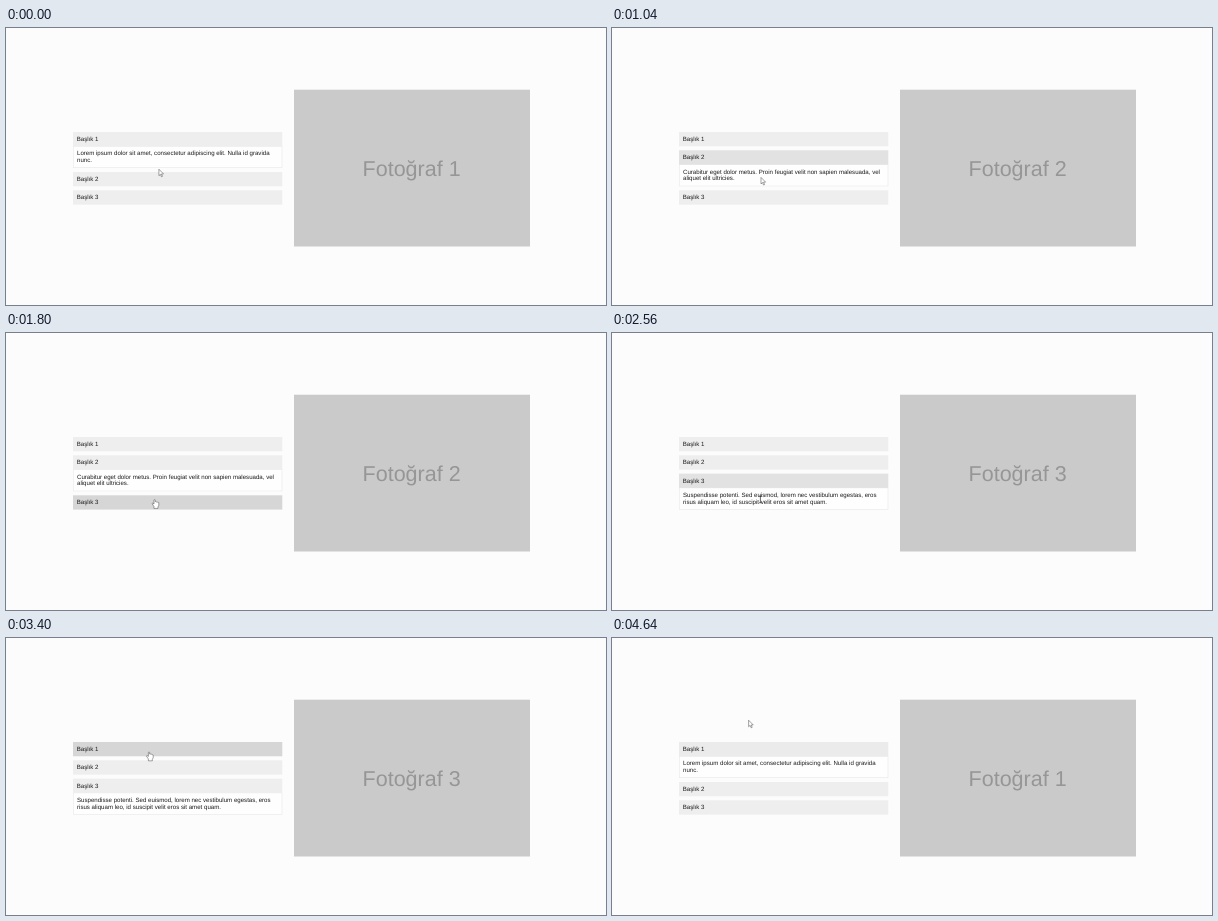
An HTML page for the animation above (8 s loop, 600 by 277 pixels).

```html
<!DOCTYPE html>
<html lang="tr">
<head>
<meta charset="utf-8">
<title>Akordeon</title>
<style>
  html, body { margin: 0; width: 100%; height: 100%; overflow: hidden; background: #fdfcfd; }
  svg { display: block; width: 100%; height: 100%; }
  text { font-family: "Liberation Sans", Arial, sans-serif; font-size: 6.11px; fill: #1c1b1c; text-rendering: geometricPrecision; }
  #photo text { font-size: 21.5px; fill: #979697; text-anchor: middle; }
  .panel { fill: #fefefe; stroke: #e9e8e9; stroke-width: .6; }
  #cursor path { fill: #fff; stroke: #3a3a3a; stroke-width: 1.1; stroke-linejoin: round; }
  #cursor #ibeam { fill: none; stroke: #222; stroke-width: 1.6; }
</style>
</head>
<body>
<svg viewBox="0 0 600 277">
  <g id="photo">
    <rect x="288" y="61.7" width="236" height="156.8" fill="#cbcacb"/>
    <text x="405.6" y="147.6"></text>
  </g>
  <g id="accordion"></g>
  <g id="cursor">
    <path id="arrow" d="M.5 .5V16L4 12.7L6.5 18.5L9 17.5L6.5 11.8H11.5Z"/>
    <path id="hand" transform="translate(-6 0)" d="M6.5 .5C5.5 .5 5 1 5 2V11L3 9.5C2 8.5 .5 9 .5 10.5L5 17V21.5H14.5V18L16.5 14V8C16.5 6.8 15 6.3 14 7C13.5 5.6 12 5.6 11 6.2C10.5 5 9 4.8 8 5.4V2C8 1 7.5 .5 6.5 .5Z"/>
    <path id="ibeam" d="M-3 -8H3M0 -8V8M-3 8H3"/>
  </g>
</svg>
<script>
const LOOP = 8000, STEP = 40, FADE = .5;
const LEFT = 67, TOP = 104, WIDTH = 209.3, HEAD = 14.3, PITCH = 18.3, PANEL = 21.7;
const BASE = 239, HOVER = 215;

const sections = [
  ["Lorem ipsum dolor sit amet, consectetur adipiscing elit. Nulla id gravida", "nunc."],
  ["Curabitur eget dolor metus. Proin feugiat velit non sapien malesuada, vel", "aliquet elit ultricies."],
  ["Suspendisse potenti. Sed euismod, lorem nec vestibulum egestas, eros", "risus aliquam leo, id suscipit velit eros sit amet quam."]
];

const origin = { x: 152.7, y: 141 };
const moves = [
  { from: 120, to: 360, x: 148.8, y: 149.2 },
  { from: 1160, to: 1640, x: 148.4, y: 166.4 },
  { from: 2560, to: 3320, x: 142.8, y: 113.8, overshoot: 1.7 },
  { from: 4520, to: 4640, x: 136.4, y: 82 }
];
const clicks = [1040, 2560, 4080];

const $ = id => document.getElementById(id);
const photoText = document.querySelector("#photo text");

function add(parent, tag, attrs, content = "") {
  const node = document.createElementNS("http://www.w3.org/2000/svg", tag);
  for (const key in attrs) node.setAttribute(key, attrs[key]);
  node.textContent = content;
  return parent.appendChild(node);
}

const parts = sections.map((lines, i) => {
  const group = add($("accordion"), "g", {});
  const panel = add(group, "g", {});
  add(panel, "rect", { class: "panel", x: LEFT + .3, y: HEAD, width: WIDTH - .6, height: PANEL - .3 });
  const boxes = lines.map((line, n) => add(panel, "text", { x: 71, y: 23.3 + n * 6.8 }, line).getBBox());
  const head = add(group, "rect", { x: LEFT, y: 0, width: WIDTH, height: HEAD });
  add(group, "text", { x: 70.7, y: 9.1 }, `Başlık ${i + 1}`);
  return { group, panel, head, boxes };
});

const easeOut = (p, back = 0) => 1 + (back + 1) * (p - 1) ** 3 + back * (p - 1) ** 2;

function pointerAt(t) {
  return moves.reduce((pos, m) => {
    const p = Math.min(1, Math.max(0, (t - m.from) / (m.to - m.from)));
    const e = easeOut(p, m.overshoot);
    return { x: pos.x + (m.x - pos.x) * e, y: pos.y + (m.y - pos.y) * e };
  }, origin);
}

const headY = (i, open) => TOP + i * PITCH + (i > open ? PANEL : 0);

const headUnder = (y, open) =>
  sections.findIndex((_, i) => y >= headY(i, open) && y < headY(i, open) + HEAD);

const overText = ({ x, y }, open) => parts[open].boxes.some(b => {
  const localY = y - headY(open, open);
  return x >= b.x && x <= b.x + b.width && localY >= b.y && localY <= b.y + b.height;
});

// Replays pointer, clicks and hover fades once, so each moment has a fixed state.
function simulate() {
  const states = [];
  let open = 0, glow = sections.map(() => 0);
  for (let t = 0; t < LOOP; t += STEP) {
    const pointer = pointerAt(t);
    if (clicks.includes(t)) open = headUnder(pointer.y, open);
    const hovered = headUnder(pointer.y, open);
    glow = glow.map((g, i) => g + ((i === hovered) - g) * FADE);
    const shape = hovered >= 0 ? "hand" : overText(pointer, open) ? "ibeam" : "arrow";
    states.push({ pointer, open, glow, shape });
  }
  return states;
}

function draw({ pointer, open, glow, shape }) {
  photoText.textContent = `Fotoğraf ${open + 1}`;
  parts.forEach(({ group, panel, head }, i) => {
    const level = Math.round(BASE + (HOVER - BASE) * glow[i]);
    group.setAttribute("transform", `translate(0 ${headY(i, open)})`);
    panel.style.display = i === open ? "" : "none";
    head.style.fill = `rgb(${level}, ${level - 1}, ${level})`;
  });
  $("cursor").setAttribute("transform", `translate(${pointer.x} ${pointer.y}) scale(.42)`);
  for (const id of ["arrow", "hand", "ibeam"]) $(id).style.display = id === shape ? "" : "none";
}

const states = simulate();
let start;
function tick(now) {
  start ??= now;
  draw(states[Math.floor(((now - start) % LOOP) / STEP)]);
  requestAnimationFrame(tick);
}
draw(states[0]);
requestAnimationFrame(tick);
</script>
</body>
</html>
```
